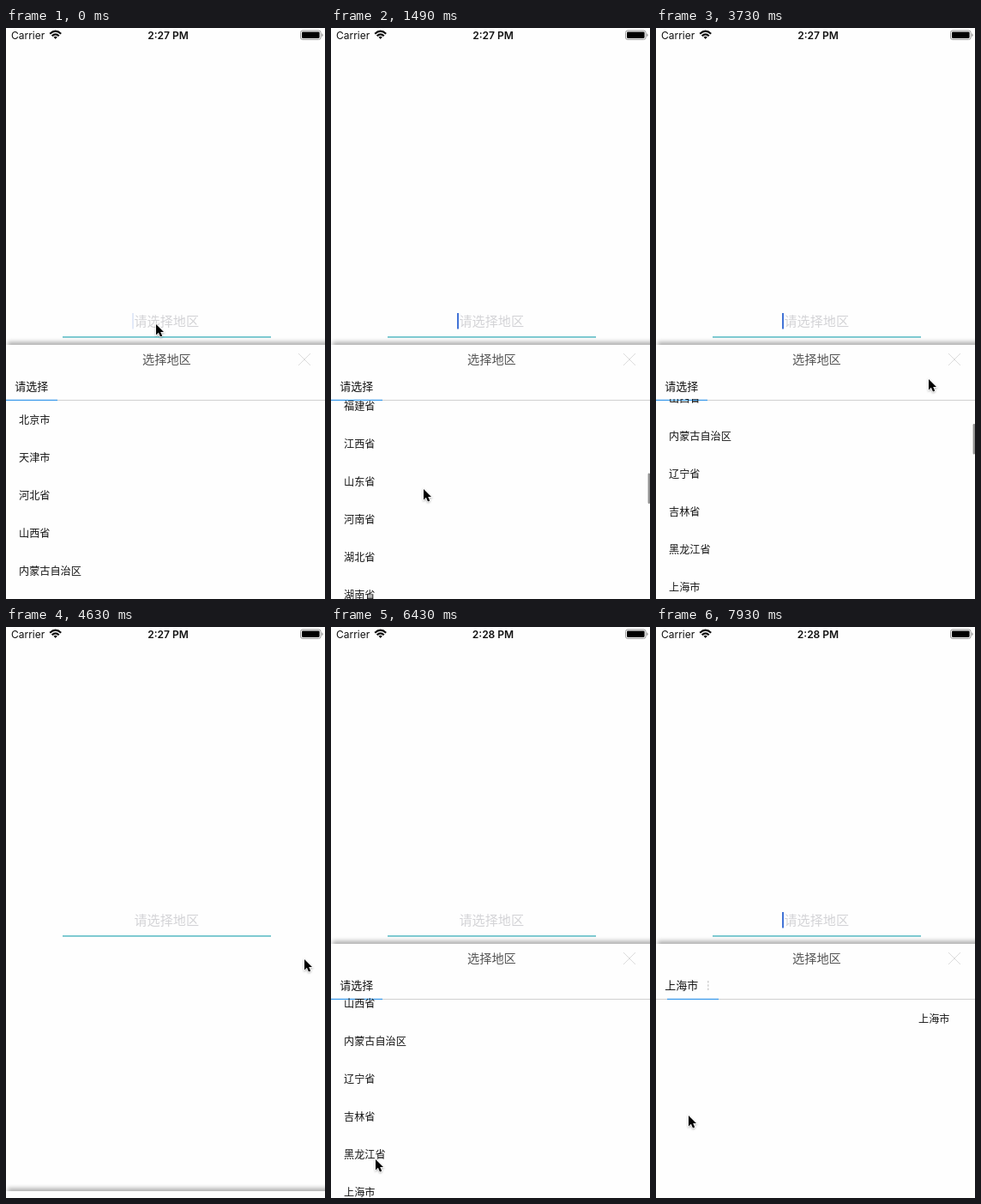
These frames come from a looping animation (372 px wide and 665 px high, 8 s). An HTML page:

```html
<!DOCTYPE html>
<html lang="zh-CN">
<head>
<meta charset="utf-8">
<title>选择地区</title>
<style>
  html, body { margin: 0; width: 100%; height: 100%; overflow: hidden; background: #fefefe; }
  svg { display: block; width: 100vw; height: 100vh; }
  text { font-family: "Noto Sans CJK SC", "Noto Sans CJK", sans-serif; fill: #151515; }
  .status { font: 12px Inter, sans-serif; fill: #111; }
  .item { font-size: 12.15px; }
  .shadow { filter: blur(2.4px); }
</style>
</head>
<body>
<svg viewBox="0 0 372 665">
  <defs>
    <clipPath id="listClip"><rect y="432" width="372" height="240"/></clipPath>
  </defs>
  <rect width="372" height="665" fill="#fefefe"/>

  <text class="status" x="6" y="12.5">Carrier</text>
  <g fill="none" stroke="#111" stroke-width="2.1">
    <path d="M51.2 6.8Q57.7 .6 64.2 6.8"/>
    <path d="M53.6 9.3Q57.7 5.3 61.8 9.3"/>
    <path d="M55.5 10.6Q57.7 8.8 59.9 10.6L57.7 12.9Z" fill="#111" stroke="none"/>
  </g>
  <text class="status" id="clock" x="189" y="12.5" text-anchor="middle" style="font-weight:600"></text>
  <rect x="343.5" y="3" width="23.6" height="10.4" rx="2.4" fill="none" stroke="#999"/>
  <rect x="345" y="4.5" width="20.6" height="7.4" rx="1.1"/>
  <path d="M368.2 6.3q1.4 .5 1.4 1.9t-1.4 1.9z" fill="#999"/>

  <text x="149.5" y="347.2" font-size="15.1" font-weight="300" style="fill:#d3d3d6">请选择地区</text>
  <rect x="66" y="359.2" width="243" height="1.5" fill="#56bac4"/>
  <rect id="caret" x="147" y="332" width="2" height="18.5" fill="#4273d6"/>

  <g id="sheet">
    <rect class="shadow" x="2" y="365.5" width="390" height="330" opacity=".3"/>
    <rect y="369" width="372" height="320" fill="#fefefe"/>
    <text x="159" y="391.2" font-size="14.2" style="fill:#555">选择地区</text>
    <path d="M341 379l14 14m0-14l-14 14" stroke="#dcdcdc"/>
    <text id="tab" x="10.3" y="422.1" font-size="13"></text>
    <path id="nextTab" d="M60.8 412v11" stroke="#d0d0d0" stroke-width="1.5" stroke-dasharray="2.4 1.9"/>
    <rect y="433" width="372" height="1" fill="#d0d0d0"/>
    <rect id="tabLine" y="432.8" width="60" height="1.3" fill="#3c9bea"/>
    <g clip-path="url(#listClip)">
      <g id="pages">
        <g id="provinces"></g>
        <text class="item" x="387" y="460.6">上海市</text>
      </g>
    </g>
    <rect id="scrollbar" x="369.6" width="2.6" height="35.6" rx="1.3" fill="#929292"/>
  </g>

  <g id="cursor">
    <path d="M0 0V12.4L2.9 9.8L5 14.5L7.2 13.5L5.2 9H9Z" stroke="#fff" stroke-width="1.4"
      paint-order="stroke" style="filter:drop-shadow(0 1px 1px rgba(0,0,0,.3))"/>
  </g>
</svg>
<script>
const LOOP = 8000, STEP = 150, LEAD = 20;
const SHEET_TOP = 369, SHEET_TRAVEL = 311, ROW = 44, GLIDE = 4;
const names = ('北京市 天津市 河北省 山西省 内蒙古自治区 辽宁省 吉林省 黑龙江省 上海市 江苏省 浙江省 安徽省 ' +
  '福建省 江西省 山东省 河南省 湖北省 湖南省 广东省 广西壮族自治区 海南省 重庆市 四川省 贵州省').split(' ');

// Where the pointer comes to rest, and at which step
const stops = [
  { at: 0, x: 175, y: 345 },
  { at: 5, x: 108, y: 605 },
  { at: 10, x: 108, y: 537 },
  { at: 17, x: 108, y: 564 },
  { at: 25, x: 318, y: 409 },
  { at: 29, x: 348, y: 387 },
  { at: 36, x: 178, y: 345 },
  { at: 43, x: 52, y: 620 },
  { at: 49, x: 38, y: 569 }
];

const $ = id => document.getElementById(id);
const move = (id, x, y) => $(id).setAttribute('transform', `translate(${x} ${y})`);
const show = (id, visible) => $(id).setAttribute('visibility', visible ? 'inherit' : 'hidden');

function smooth(from, to, v) {
  const k = Math.min(1, Math.max(0, (v - from) / (to - from)));
  return k * k * (3 - 2 * k);
}

function pointer(step) {
  let { x, y } = stops[0];
  for (const stop of stops.slice(1)) {
    const k = smooth(stop.at - GLIDE, stop.at, step);
    x += (stop.x - x) * k;
    y += (stop.y - y) * k;
  }
  return [x, y];
}

// A drag up, a fling back that decays, and a last short drag
const scrollAt = step =>
  575 * smooth(4, 11, step)
  - 425 * (1 - Math.exp(-Math.max(0, step - 13.5) / 2.8))
  + 86 * smooth(45, 49, step);

const sheetOffset = step => SHEET_TRAVEL * (smooth(28, 31.6, step) - smooth(38, 41, step));

$('provinces').innerHTML = names
  .map((name, i) => `<text class="item" x="15" y="${460.6 + ROW * i}">${name}</text>`).join('');

function render(time) {
  const step = Math.floor((time % LOOP + LEAD) / STEP);
  const scroll = scrollAt(step);
  const offset = sheetOffset(step);
  const sliding = step >= 53;

  $('clock').textContent = step < 34 ? '2:27 PM' : '2:28 PM';
  show('caret', step < 29 || (step >= 39 && (step - 39) % 7 < 4));
  $('caret').setAttribute('opacity', step ? 1 : .15);

  move('sheet', 0, offset);
  show('sheet', offset < SHEET_TRAVEL - 1);
  $('tab').textContent = step < 52 ? '请选择' : '上海市';
  show('nextTab', sliding);
  move('tabLine', sliding ? 13 : 0, 0);
  move('pages', sliding ? -81 : 0, 0);
  move('provinces', 0, -scroll);

  show('scrollbar', Math.abs(scroll - scrollAt(step - 3)) > 1);
  $('scrollbar').setAttribute('y', 437.5 + .149 * scroll);
  move('cursor', ...pointer(step));
}

let start;
function tick(now) {
  start ??= now;
  render(now - start);
  requestAnimationFrame(tick);
}
render(0);
requestAnimationFrame(tick);
</script>
</body>
</html>
```
